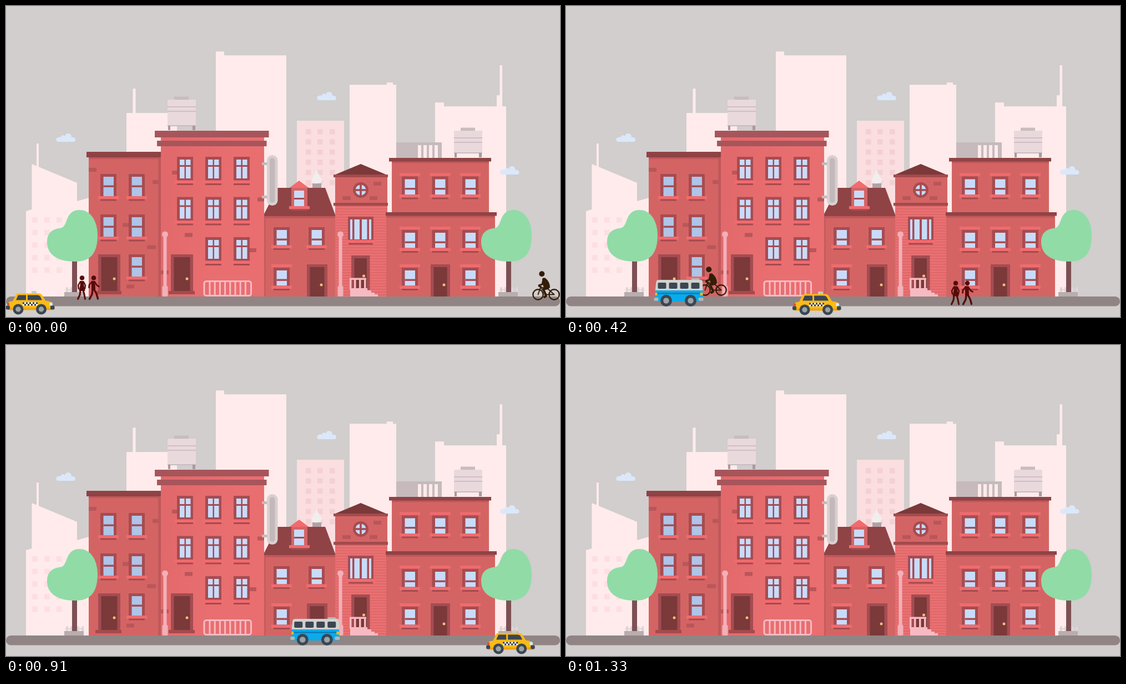
Recreate the animation shown at these times as an HTML page. Size 998 by 561 pixels, loop 1.4 s.

```html
<!DOCTYPE html>
<html lang="en">
<head>
<meta charset="utf-8">
<title>City street</title>
<style>
html, body { margin: 0; width: 100%; height: 100%; overflow: hidden; background: #d1cecd; }
svg { display: block; width: 100%; height: 100%; }
</style>
</head>
<body>
<svg id="stage" viewBox="0 0 998 561" xmlns="http://www.w3.org/2000/svg"></svg>
<script>
const C = {
  sky: '#d1cecd', far: '#ffebeb', wall: '#d46464', lit: '#e96e70', frame: '#a54c52',
  roof: '#8f4345', door: '#7b3939', sill: '#f16b6e', shade: '#a34b4e', brick: '#b9565a',
  glass: '#c9dbfa', dim: '#aec4e8', pink: '#f7bac2', tyre: '#3b4652', hub: '#9aa3a8',
  cornice: '#a7555b', under: '#c0585b'
};

// Boxes are given by their edges: left, top, right, bottom.
const box = (l, t, r, b, fill, rx = 0) =>
  `<rect x="${l}" y="${t}" width="${r - l}" height="${b - t}" fill="${fill}" rx="${rx}"/>`;
const dot = (x, y, r, fill) => `<circle cx="${x}" cy="${y}" r="${r}" fill="${fill}"/>`;
const shape = (d, fill) => `<path d="${d}" fill="${fill}"/>`;
const line = (d, color, w) =>
  `<path d="${d}" fill="none" stroke="${color}" stroke-width="${w}" stroke-linecap="round" stroke-linejoin="round"/>`;
const each = (list, fn) => list.map(fn).join('');
const range = n => [...Array(n).keys()];
const at = (x, y, s) => `<g transform="translate(${x} ${y})">${s}</g>`;
const bricks = list => each(list, ([x, y, w]) => box(x, y, x + w, y + 7, C.brick));

const cloud = (x, y) => at(x, y, shape(
  'M4 15a4 4 0 0 1-1-8q2-2 5 0q0-4 4-4q2 0 3 2q1-5 6-5q6 0 6 7q6-1 7 4q0 4-4 4Z', '#dbe8fa'));

const grid = (xs, y, rows, step, size, fill) =>
  each(range(rows), i => each(xs, x => box(x, y + i * step, x + size, y + i * step + size, fill)));

function skyline() {
  return box(55, 248, 59, 292, C.far) +
    shape('M36 524V370L46.500 367V285L128 319V352L150 346V524Z', C.far) +
    grid([47, 69, 91], 381, 5, 22.6, 10, '#fddfe1') +
    box(228.5, 149, 233.5, 195, C.far) + box(217, 193, 308, 270, C.far) +
    box(378, 82, 393, 100, C.far) + box(378, 89, 505, 524, C.far) +
    box(524, 207, 609, 524, '#fbdee0') + grid([540, 561, 583], 222, 6, 18.4, 9.5, '#f4d0d3') +
    box(686, 138, 697, 150, C.far) + box(619, 142, 703, 524, C.far) +
    box(773, 174, 789, 190, C.far) + box(889.5, 107, 894, 170, C.far) +
    box(884, 161, 894, 190, C.far) + box(773, 181, 901, 524, C.far) +
    cloud(91, 230) + cloud(561, 155) + cloud(890.5, 289);
}

const tank = (x, y, h) => at(x, y,
  box(12, -5.5, 38, 1, '#c8bcbf') + box(0, 0, 51, h, '#ead9dc') +
  each([12, 20], s => box(0, s, 51, s + 1.7, '#cbbabf')) +
  box(0, h - 1, 51, h + 1, '#c8bcbf') +
  box(1, h, 5, h + 8, '#a8999c') + box(45, h, 50, h + 8, '#a8999c'));

const ledge = (l, t, w) => box(l - 4, t, l + w + 4, t + 5.5, C.sill) +
  box(l, t + 5.5, l + w, t + 8.5, C.shade);

// Sash window, two panes one above the other; bar is the drop of the divider.
const sash = (x, y, h, glass, bar, hood) =>
  (hood ? box(x - 4, y - 6, x + 33, y - 1, C.sill) : '') +
  box(x, y, x + 29, y + h, C.frame) +
  box(x + 5.5, y + 5, x + 24, y + h - 1, glass) +
  box(x + 5.5, y + bar, x + 24, y + bar + 3.4, C.frame) + ledge(x, y + h - 1, 29);

const low = (x, y, hood) => sash(x, y, 33.5, C.glass, 20.5, hood);

const cross = (x, y) => box(x, y, x + 29, y + 43, C.frame) +
  each([5, 16], p => box(x + p, y + 5, x + p + 8.5, y + 15, C.glass) +
    box(x + p, y + 18, x + p + 8.5, y + 39, C.glass)) + ledge(x, y + 42.5, 29);

const door = (l, t, r, b, knobY) => box(l, t, r, b, C.frame) +
  box(l + 5.5, t + 5, r - 5.5, b, C.door) + dot(r - 11, knobY, 2.5, '#efc07c');

const step = (l, r) => box(l, 514, r, 520, C.shade);

function houseA() {
  return box(149, 270, 279, 524, C.wall) + box(274, 273, 279, 524, C.under) +
    box(149, 273, 279, 276, C.under) + box(145, 263, 279, 273, C.roof) +
    bricks([[149, 292, 14], [264, 314, 10], [210, 391.5, 12], [254, 431.5, 16], [217, 502.5, 14]]) +
    each([[170, 303], [221, 303], [170, 376], [221, 376], [221, 448]],
      ([x, y]) => sash(x, y, 41, C.dim, 20.5)) +
    door(166, 448, 206, 514, 492) + step(161, 208);
}

function houseB() {
  return box(279, 235, 465, 524, 'url(#sun)') +
    box(268, 225, 473.5, 237, C.cornice) + box(272, 243, 469.5, 253, C.cornice) +
    bricks([[299, 297, 10], [453, 345.5, 12], [322, 409.5, 14], [439, 437, 12], [279, 477, 14]]) +
    each([308, 359, 410], x => each([272, 344.5, 417],
      y => x === 308 && y === 417 ? '' : cross(x, y))) +
    door(297, 448, 337, 514, 492) + step(293, 340);
}

function houseC() {
  return box(463, 377, 594, 524, C.wall) + box(463, 379, 468, 524, '#c65b5e') +
    box(463, 379, 594, 383, C.under) +
    shape('M489 328H575L594 379H463Z', C.roof) +
    box(552, 320, 568, 328, '#b1a2a5') +
    shape('M552 319q-3-6 1-9q-1-5 4-7q0-5 4-7q-1 5 2 7q3 2 2 6q5 1 4 7q-2 4-7 4q-7 1-10-1Z', '#f1eeee') +
    box(514, 327, 543, 362, C.wall) + shape('M510.500 328L528 315L545.500 328Z', C.sill) +
    box(519, 333, 537, 361, C.glass) + box(519, 346, 537, 349, C.frame) + ledge(514, 361, 29) +
    low(482, 399) + low(545, 399) + low(482, 472, true) +
    door(542, 466, 579, 524, 503);
}

function houseD() {
  return box(593, 307, 687, 360, C.wall) + box(593, 360, 687, 524, '#e3696b') +
    each(range(33), i => box(593, 363 + i * 5, 687, 364 + i * 5, '#ee7b7d')) +
    shape('M591 305L639 285L687 305Z', C.door) + box(590, 304, 688, 309, C.shade) +
    box(590, 355, 688, 360.5, C.shade) +
    bricks([[662, 317, 14], [606, 343, 15], [655, 343, 14]]) +
    dot(639, 332, 14, C.frame) + dot(639, 332, 9.5, C.glass) +
    box(637.2, 322, 640.8, 342, C.frame) + box(629, 330.2, 649, 333.8, C.frame) +
    box(616, 380, 662, 423, C.frame) +
    each([[620, 4], [627.5, 9.5], [641, 9.5], [654, 4]],
      ([x, w]) => box(x, 385, x + w, 421, C.glass)) +
    ledge(617, 422, 44) + door(622, 450, 655.5, 512, 487) +
    shape('M620 524V509H651V513H658V517H664V520H670V524Z', C.pink) +
    box(619, 490.5, 649, 494, C.pink) +
    each([619, 627, 636, 645], x => box(x, 491, x + 3.5, 512, C.pink));
}

function houseE() {
  return box(703, 246, 785, 274, '#c6babc') +
    each([742, 752, 762, 772], x => box(x, 251, x + 6, 274, C.far)) +
    box(695, 278, 870, 375, C.wall) + box(695, 280, 870, 283.5, C.under) +
    box(690, 274, 874, 280.5, C.roof) +
    box(685, 377, 881, 524, C.wall) + box(685, 378, 881, 382, C.under) +
    box(684, 372, 884, 378.5, C.roof) +
    each([713, 767.5, 822], x => low(x, 307.5, true) + low(x, 404, true)) +
    low(713, 472, true) + low(822, 472, true) +
    door(765, 466, 800, 524, 503);
}

const lamp = x => box(x - 3, 412, x + 3, 524, '#f2b0b8', 2) +
  box(x - 5, 505, x + 5, 524, '#f2b0b8', 2) + dot(x, 412, 5.5, '#f2b0b8');

const tree = x => at(x, 0,
  each([108, 116, 128, 136], p => box(p, 507, p + 4, 517, '#ded5d5', 2)) +
  box(107, 511, 141, 513, '#ded5d5') + box(119, 455, 128, 517, '#7c5054') +
  box(105, 516, 140, 524, '#b9adaf') +
  shape('M131 368C155 367 165 392 165 413C165 446 152 461 125 461C92 461 74 448 74 426' +
    'C74 407 86 402 99 400.500C112 398 106 369 131 368Z', '#91dba7'));

function street() {
  const bars = each(range(8), i => box(365.5 + i * 9.2, 497, 368.5 + i * 9.2, 522, C.pink));
  return box(461, 282, 472, 287, '#c6babc') + box(461, 342, 472, 347, '#c6babc') +
    box(470, 269, 489.5, 360, '#dacfd0', 9.5) + box(475, 274, 484.5, 355, '#c3b8ba', 4.7) +
    `<rect x="357" y="496.5" width="84.5" height="26" rx="4" fill="none" stroke="${C.pink}" stroke-width="3"/>` +
    bars + lamp(286.5) + lamp(602.5) + tree(0) + tree(782) +
    box(0, 524, 998, 541.5, '#908584', 8.7);
}

const wheel = (x, y, r) => dot(x, y, r, C.tyre) + dot(x, y, r * .5, C.hub);

function taxi() {
  const checks = each(range(9), i =>
    box(30 + i * 3, 21 + i % 2 * 3, 33 + i * 3, 24 + i % 2 * 3, '#30363e'));
  return box(46, .5, 55, 7, '#c9cbc8', 2) +
    shape('M12 19L18 7Q19 5 22 5H59Q63 5 65 8L71 18Q82 19 84 24L85 34H3V25Q3 19 12 19Z', '#fbba17') +
    shape('M18 17L22 8H36V17Z', C.tyre) + shape('M39 8H57Q60 8 62 11L65 17H39Z', C.tyre) +
    box(30, 21, 57, 27, '#fff') + checks +
    box(3, 31, 85, 35, '#eea312') +
    box(2, 22, 6, 27, '#e8483c', 1) + dot(81, 24, 3, '#c8ecfb') +
    box(0, 27, 7, 34, C.tyre, 2) + box(80, 27, 87.5, 34, C.tyre, 2) +
    wheel(22, 33.5, 9.5) + wheel(63.5, 33.5, 9.5);
}

function bus() {
  return box(67, 0, 82, 6, '#b5b7b5', 2) +
    shape('M2 25L4 6Q5 3 9 3H84Q87 3 87.500 6L88 25Z', '#d0d2cf') +
    each([7, 27, 47, 67], l => box(l, 8, l + 15, 19, C.tyre, 2)) +
    shape('M2 22H88V38Q88 42 85 42H5Q2 42 2 38Z', '#0aabec') +
    box(2, 26, 88, 29, '#0b83bd') +
    box(2, 26, 6, 31, '#fbbb1b', 1) + box(83, 26, 88, 31, '#fbbb1b', 1) +
    box(0, 35, 8, 41, '#b5b7b5', 2) + box(80, 35, 89, 41, '#b5b7b5', 2) +
    wheel(22, 40.5, 10.5) + wheel(66, 40.5, 10.5);
}

function cyclist() {
  const ink = '#341d08', ring = x =>
    `<circle cx="${x}" cy="42.5" r="9.2" fill="none" stroke="${ink}" stroke-width="2.4"/>`;
  return ring(10.5) + ring(39.5) + dot(17.3, 5.3, 5, ink) +
    line('M10.500 42.500L15 29L28 32L39.500 42.500H26L16 31M12 28H16', ink, 1.9) +
    shape('M18 14Q20 11 24 13Q32 20 32 30Q28 33 21 30Q18 24 18 14Z', ink) +
    line('M20 15L18 24L12 26', ink, 3) + line('M28 31L20 33L25 45L22 47', ink, 4);
}

function walkers() {
  const ink = '#570b09';
  return dot(10, 4.5, 4.3, ink) + dot(31, 4.5, 4.3, ink) +
    shape('M7 10H13L13.500 18L15.500 28H4.500L6.500 18Z', ink) +
    line('M7 11L3 18L4 24M13 12L16 18L15 24', ink, 2.4) +
    line('M7 27L6 35L2.500 42.500M12 27L14 34L15.500 42.500', ink, 3) +
    shape('M27 10H33.500L34 27H27Z', ink) +
    line('M28 11L23 17L22.500 22M33 12L37 18L40.500 20', ink, 2.6) +
    line('M29 26L28 34L23.500 42.500M32 26L36 33L38.500 42', ink, 3.4);
}

// Route points: tick, x, y. Layers go from back to front.
const STEP = 70, TICKS = 20;
const actors = [
  { draw: cyclist, route: [[0, 948, 478], [4, 402, 485], [6, 240, 470], [9, 22, 470], [11, -110, 470]] },
  { draw: walkers, route: [[0, 127, 486], [4, 479, 491.5], [6, 692, 495.5], [9, 899, 494.5], [11, 969, 496], [13, 1030, 496]] },
  { draw: bus, route: [[0, -130, 491], [4, 66, 491], [6, 158.5, 491], [9, 316.5, 491], [11, 417, 491], [15, 629.5, 491], [19, 1010, 491]] },
  { draw: taxi, route: [[0, 0, 513.5], [4, 266, 514.5], [6, 408, 514.5], [9, 588.5, 516.5], [11, 722, 514.5], [15, 1010, 515]] }
];

// Smooth curve through the route points, axis 1 = x, 2 = y.
function along(route, t, axis) {
  const last = route.length - 1;
  if (t >= route[last][0]) return route[last][axis];
  const i = route.findIndex((p, k) => t < route[k + 1][0]);
  const slope = k => {
    const a = route[Math.max(k - 1, 0)], b = route[Math.min(k + 1, last)];
    return (b[axis] - a[axis]) / (b[0] - a[0]);
  };
  const p = route[i], q = route[i + 1], span = q[0] - p[0], u = (t - p[0]) / span;
  const ease = u * u * (3 - 2 * u);
  return p[axis] + (q[axis] - p[axis]) * ease +
    span * u * (1 - u) * ((1 - u) * slope(i) - u * slope(i + 1));
}

const stage = document.getElementById('stage');
stage.innerHTML =
  '<defs><linearGradient id="sun" x1="0" y1="0" x2="1" y2="0.3">' +
  `<stop offset="0.15" stop-color="#e2696b"/><stop offset="0.7" stop-color="${C.lit}"/></linearGradient></defs>` +
  box(0, 0, 998, 561, C.sky) + skyline() + tank(291, 169, 47) + tank(807, 225, 40) +
  houseA() + houseC() + houseB() + houseD() + houseE() + street() +
  each(actors, a => `<g class="actor">${a.draw()}</g>`);
const nodes = stage.querySelectorAll('.actor');

function render(ms) {
  const tick = Math.floor(ms / STEP) % TICKS;
  actors.forEach(({ route }, i) => {
    const x = along(route, tick, 1), y = along(route, tick, 2);
    nodes[i].setAttribute('transform', `translate(${x.toFixed(2)} ${y.toFixed(2)})`);
  });
}

const start = performance.now();
function loop() {
  render(performance.now() - start);
  requestAnimationFrame(loop);
}
loop();
</script>
</body>
</html>
```
